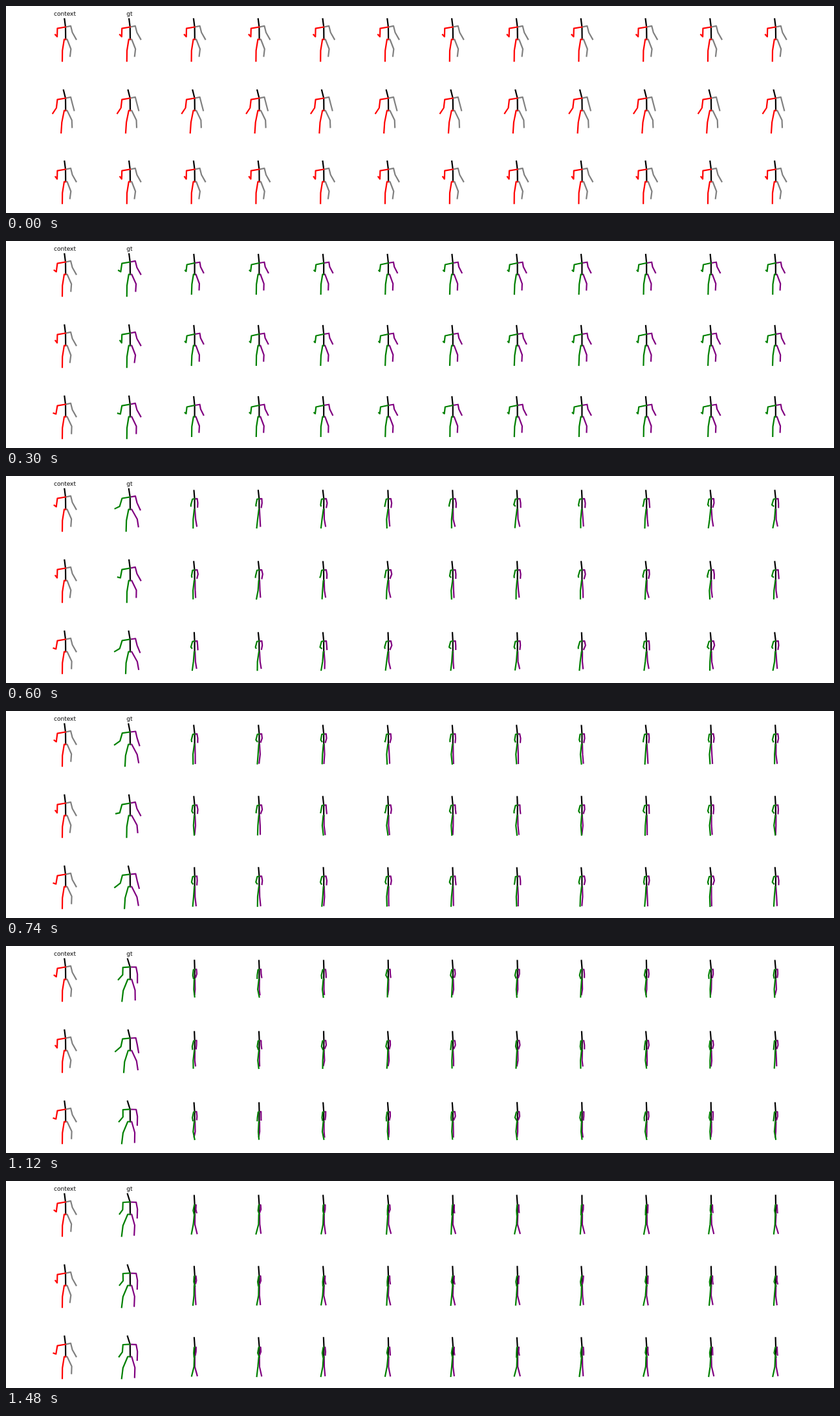
These frames come from a looping animation (1280x320 px, 1500 ms). An HTML page with a canvas:

```html
<!DOCTYPE html>
<html lang="en">
<head>
<meta charset="utf-8">
<title>Walking figures</title>
<style>
  html, body { margin: 0; overflow: hidden; background: #fff; }
  canvas { display: block; }
</style>
</head>
<body>
<canvas id="stage" width="1280" height="320"></canvas>
<script>
const ctx = document.getElementById('stage').getContext('2d');
const LOOP = 1500, STEP = 20, SPLIT = 300;
const COLUMNS = 12, COLUMN_GAP = 99.8, ROW_GAP = 110, LEFT = 91;
const rowShift = [0, -240, 60]; // every row shows the same walk at another moment

const clamp = u => Math.min(1, Math.max(0, u));
const smooth = (from, to, t) => {
  const u = clamp((t - from) / (to - from));
  return u * u * (3 - 2 * u);
};
const wave = (t, peak, period) => Math.cos((t - peak) / period * 2 * Math.PI);
const random = n => {
  const r = Math.sin(n * 127.1 + 31.7) * 43758.5453;
  return r - Math.floor(r);
};

// A joint rests at (x, y), moves by turn as the body turns, by drift with the drift,
// and swings around that place in the rhythm of the gait.
const joint = (x, y, turn = [0, 0], { drift = [0, 0], swing = [0, 0], peak = 0 } = {}) =>
  ({ rest: [x, y], turn, drift, swing, peak });

function locate(j, motion, t) {
  return j.rest.map((rest, axis) => rest
    + j.turn[axis] * motion.turn(t)
    + j.drift[axis] * motion.drift(t)
    + j.swing[axis] * motion.gait(t) * wave(t, j.peak, motion.period[axis]));
}

// The recorded walk turns slowly; its drift is the arm that still hangs at first
const neck = joint(1, 32.5), pelvis = joint(1.2, 51.5);
const walker = {
  motion: {
    turn: t => smooth(400, 1250, t),
    drift: t => 1 - smooth(-300, 0, t),
    gait: () => 1,
    period: [1280, 1280]
  },
  spine: [pelvis, neck, joint(-.6, 20, [-2.4, 0], { drift: [-1.7, 0] })],
  left: [
    [neck,
      joint(9, 30.8, [1.4, 2]),
      joint(11.6, 41, [.8, 2.6]),
      joint(17.5, 51.4, [-5.5, 5.5], { drift: [-3.5, 0] })],
    [pelvis,
      joint(3.5, 51.5),
      joint(10.9, 66.5, [-1.5, 2], { swing: [1.6, 0], peak: 700 }),
      joint(11.2, 77.5, [-1, 6], { swing: [3.4, 0], peak: 720 })]
  ],
  right: [
    [neck,
      joint(-11.6, 34.7, [1.6, -1.7]),
      joint(-13.7, 47.5, [2.2, -3.2], { swing: [-1.8, 0], peak: 650 }),
      joint(-18.7, 47, [0, 6.5], { swing: [-4.2, 3], peak: 720, drift: [0, 10] })],
    [pelvis,
      joint(-1, 51.5, [-1.6, 0]),
      joint(-3.8, 69, [-6.2, 0], { drift: [-1, 1] }),
      joint(-4, 85.2, [-8, 0], { drift: [-2, 1] })]
  ]
};

// The predicted walk turns sideways at once, then narrows and takes its strides
const sampleNeck = joint(1, 34, [0, 1], { drift: [.2, 2] }), samplePelvis = joint(1, 51.7);
const sample = {
  motion: {
    turn: t => smooth(290, 470, t),
    drift: t => clamp((t - 460) / 1020),
    gait: t => smooth(290, 470, t),
    period: [1020, 660]
  },
  spine: [samplePelvis, sampleNeck, joint(-.3, 21, [.3, 1.5], { drift: [.5, 0] })],
  left: [
    [sampleNeck,
      joint(9, 32.7, [-3.8, 2.1], { drift: [-2, 2.2] }),
      joint(10.3, 40, [-4, 1.5], { drift: [-3, 2.5] }),
      joint(15, 49, [-9.8, -1], { drift: [-2.3, .8] })],
    [samplePelvis,
      joint(3, 51.7, [-1.5, 0]),
      joint(8.4, 66, [-6.2, 1], { drift: [-.8, 0] }),
      joint(8, 75.5, [-5.7, 2.5], { swing: [1.6, -3], peak: 460 })]
  ],
  right: [
    [sampleNeck,
      joint(-11, 36.5, [8.3, -1], { drift: [3, 2] }),
      joint(-12.3, 47, [7.5, -2.7], { drift: [4, 1.5] }),
      joint(-13.8, 45.5, [9.5, 0], { drift: [4.8, 6.5] })],
    [samplePelvis,
      joint(-.8, 51.7, [1.2, 0]),
      joint(-3.3, 67, [2, 0], { drift: [.8, 0] }),
      joint(-3.7, 82, [2.7, -1.8], { swing: [-1.7, -1.5], peak: 460 })]
  ]
};

// Samples sway away from each other, more so towards the end of a limb
function sway(seed, depth, t) {
  const reach = .13 * depth * depth * smooth(SPLIT - 60, SPLIT + 200, t);
  const angle = 2 * Math.PI * random(seed) + t * (.006 + .004 * random(seed + .5));
  return [reach * Math.cos(angle), reach * .25 * Math.sin(angle)];
}

function drawFigure(body, column, row, t, leftColor, rightColor, seed = 0) {
  const drawLimb = (joints, color, limb) => {
    ctx.strokeStyle = color;
    ctx.beginPath();
    joints.forEach((j, depth) => {
      const [x, y] = locate(j, body.motion, t);
      const [dx, dy] = seed ? sway(seed * 20 + limb * 4 + depth, depth, t) : [0, 0];
      ctx.lineTo(LEFT + column * COLUMN_GAP + x + dx, row * ROW_GAP + y + dy);
    });
    ctx.stroke();
  };
  drawLimb(body.spine, '#000', 0);
  body.left.forEach((limb, i) => drawLimb(limb, leftColor, 1 + i));
  body.right.forEach((limb, i) => drawLimb(limb, rightColor, 3 + i));
}

function render(now) {
  const t = Math.floor(now % LOOP / STEP) * STEP;
  const known = t < SPLIT;
  const colors = known ? ['gray', 'red'] : ['purple', 'green'];
  ctx.fillStyle = '#fff';
  ctx.fillRect(0, 0, 1280, 320);
  ctx.fillStyle = '#000';
  ctx.font = '9px "DejaVu Sans", sans-serif';
  ctx.textAlign = 'center';
  ctx.fillText('context', LEFT, 15);
  ctx.fillText('gt', LEFT + COLUMN_GAP, 15);
  ctx.lineWidth = 2.2;
  ctx.lineCap = 'square';
  ctx.lineJoin = 'round';
  rowShift.forEach((shift, row) => {
    drawFigure(walker, 0, row, Math.min(t, SPLIT - STEP) + shift, 'gray', 'red');
    for (let column = 1; column < COLUMNS; column++) {
      if (known || column === 1) drawFigure(walker, column, row, t + shift, ...colors);
      else drawFigure(sample, column, row, t, ...colors, row * COLUMNS + column);
    }
  });
}

const start = performance.now();
function tick() {
  render(performance.now() - start);
  requestAnimationFrame(tick);
}
tick();
</script>
</body>
</html>
```
